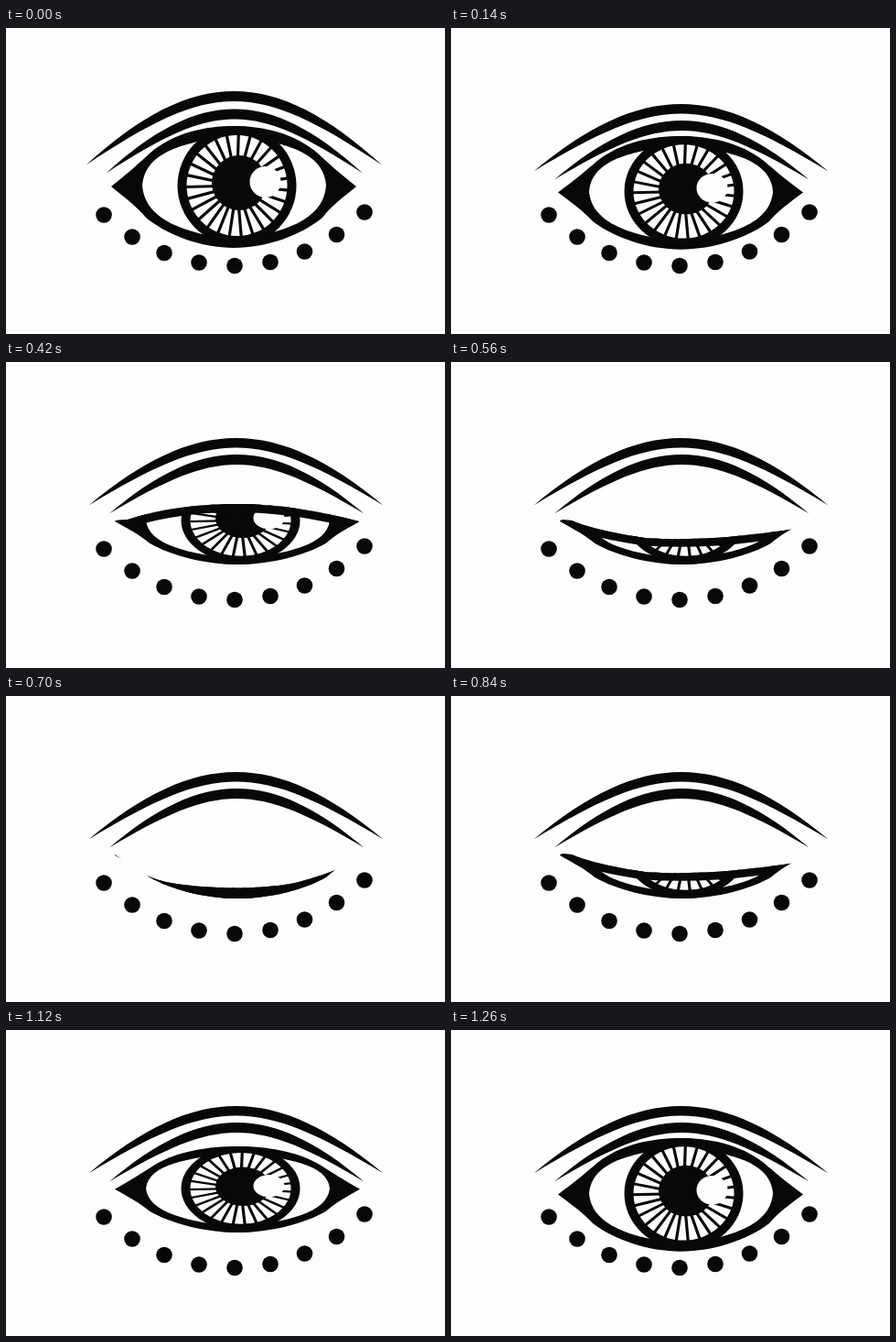
Write an HTML page with a canvas that moves like this. It is 480 px wide and 334 px high and loops after 1400 ms.

```html
<!DOCTYPE html>
<html lang="en">
<head>
<meta charset="utf-8">
<title>Blinking eye</title>
<style>
  html, body { margin: 0; height: 100%; overflow: hidden; background: #fdfdfd; }
  canvas { display: block; }
</style>
</head>
<body>
<canvas id="stage" width="480" height="334"></canvas>
<script>
const ctx = document.getElementById('stage').getContext('2d');
const INK = '#080808', PAPER = '#fdfdfd';
const STEP = 140;

const almond = new Path2D('M115 173C133 159 146 147 158 136C184 114 218 107 249 107' +
  'C280 107 314 114 340 136C352 147 365 159 383 173C367 186 356 194 346 207' +
  'C323 226 285 240 249 240C214 240 176 226 153 207C142 194 131 186 115 173Z');
const sclera = new Path2D('M149 172C152 134 196 125 249 117C303 125 347 134 350 172' +
  'C347 210 303 224 249 231C196 224 152 210 149 172Z');

const dots = [[107, 204], [138, 228], [173, 245.5], [211, 256], [250, 259.5],
  [289, 255.5], [326.5, 244], [361.5, 225.5], [392, 201]];

// Eye placement: shift right, top edge, vertical scale
const open = { dx: 0, top: 107, scale: 1, raised: true };
const relaxed = { dx: 2, top: 118, scale: 0.93 };
const narrow = { dx: 4, top: 127, scale: 0.707 };
// A lid is the upper edge that cuts the narrow eye
const half = { ...narrow, thick: 9,
  lid: 'M119 173L133 172C170 160 210 155 252 155C300 155 345 163 386 174' };
const low = { ...narrow, thick: 8.5,
  lid: 'M119 172L132 173C150 181 185 188 212 192C255 195 300 192 330 188Q350 186 376 182' };
const shut = { ...narrow, thick: 12,
  lid: 'M119 173C135 185 152 198 175 203C215 211 285 212 320 203Q350 195 372 185' };
const poses = [open, relaxed, narrow, half, low, shut, low, half, narrow, relaxed];

function disc(x, y, r, color) {
  ctx.fillStyle = color;
  ctx.beginPath();
  ctx.arc(x, y, r, 0, 2 * Math.PI);
  ctx.fill();
}

function brow(left, right, tip, top, bottom) {
  const mid = (left + right) / 2, w = (right - left) / 2;
  // Bend from one tip to the other; a smaller k gives straighter ends
  const arch = (dir, peak, k) => {
    const y = tip - (tip - peak) * 4 / 3;
    ctx.bezierCurveTo(mid - dir * k * w, y, mid + dir * k * w, y, mid + dir * w, tip);
  };
  ctx.fillStyle = INK;
  ctx.beginPath();
  ctx.moveTo(left, tip);
  arch(1, top, 0.27);
  arch(-1, bottom, 0.14);
  ctx.fill();
}

function iris() {
  const x = 252.5, y = 172, count = 27;
  disc(x, y, 65, INK);
  disc(x, y, 55, PAPER);
  ctx.strokeStyle = INK;
  ctx.lineWidth = 3.2;
  ctx.beginPath();
  for (let i = 0; i < count; i++) {
    const a = i / count * 2 * Math.PI + 0.09;
    ctx.moveTo(x, y);
    ctx.lineTo(x + 57 * Math.cos(a), y + 57 * Math.sin(a));
  }
  ctx.stroke();
  disc(255, 169, 30, INK);
  disc(283.5, 168, 17, PAPER);
}

function eye({ dx, top, scale, lid, thick }) {
  ctx.save();
  if (lid) ctx.clip(new Path2D(lid + 'L480 334L0 334Z'));
  ctx.setTransform(1, 0, 0, scale, dx, top - 107 * scale);
  ctx.fillStyle = INK;
  ctx.fill(almond);
  ctx.clip(almond);
  ctx.fillStyle = PAPER;
  ctx.fill(sclera);
  iris();
  if (lid) {
    ctx.resetTransform();
    ctx.lineWidth = 2 * thick;
    ctx.stroke(new Path2D(lid));
  }
  ctx.restore();
}

function draw(time) {
  const pose = poses[Math.floor(time / STEP) % poses.length];
  ctx.fillStyle = PAPER;
  ctx.fillRect(0, 0, 480, 334);
  if (pose.raised) {
    brow(87.5, 411, 149.5, 69, 80);
    brow(109.5, 390, 158.5, 88.5, 99.5);
  } else {
    brow(90.5, 412.5, 156.5, 83, 93.5);
    brow(113, 391.5, 165.5, 101, 112);
  }
  eye(pose);
  for (const [x, y] of dots) disc(x, y, 8.8, INK);
}

const start = performance.now();
function tick() {
  draw(performance.now() - start);
  requestAnimationFrame(tick);
}
tick();
</script>
</body>
</html>
```
